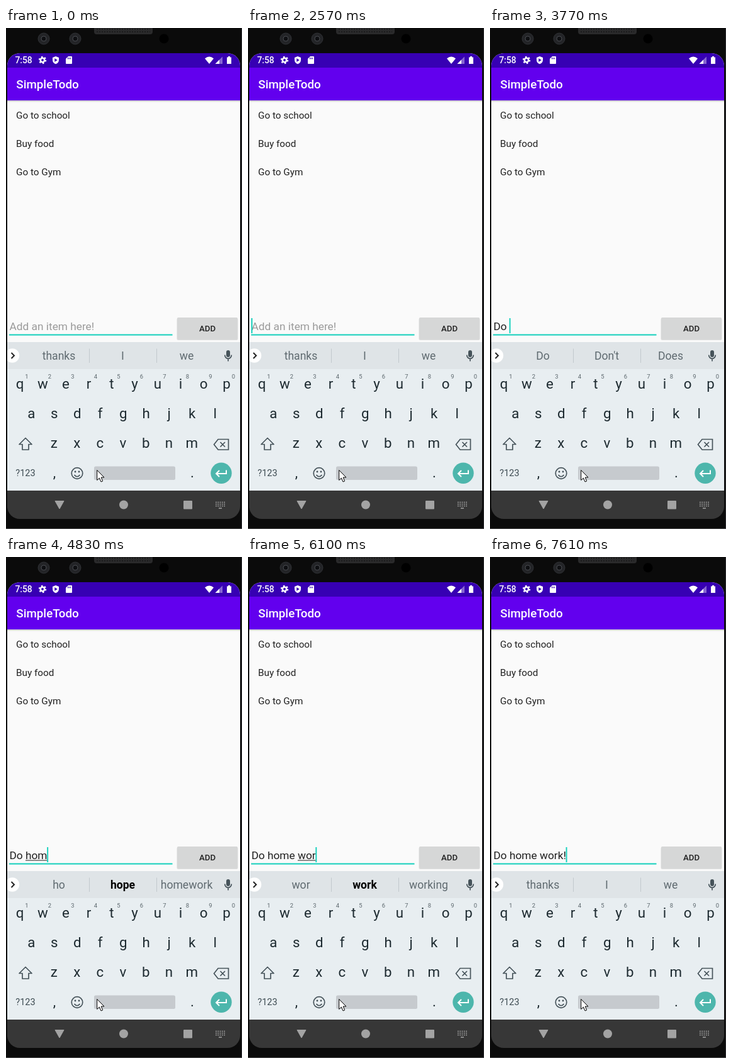
Write an HTML page that moves like this. It is 375 by 796 pixels and loops after 8 s.

```html
<!DOCTYPE html>
<html lang="en">
<head>
<meta charset="utf-8">
<title>Todo app</title>
<style>
  html, body { margin: 0; width: 100%; height: 100%; overflow: hidden; background: #0a0a0a; }
  svg { display: block; width: 375px; height: 796px; font-family: Roboto, "Open Sans", sans-serif; }
  text { white-space: pre; }
  .mid { text-anchor: middle; }
  .med { font-weight: 500; }
  .item { font-size: 15.3px; fill: #212121; }
  .entry { font-size: 17.3px; }
  .key { font-size: 22.3px; fill: #1d2a30; }
  .sup { font-size: 9.4px; fill: #5b666c; }
  .word { font-size: 17.6px; fill: #5f6a70; }
  .word.bold { font-weight: 700; fill: #000; }
  .line { fill: none; stroke: #46535a; stroke-width: 1.7; }
</style>
</head>
<body>
<svg viewBox="0 0 375 796">
  <defs>
    <linearGradient id="shade" x2="0" y2="1">
      <stop offset="0" stop-color="#000" stop-opacity=".22"/>
      <stop offset="1" stop-color="#000" stop-opacity="0"/>
    </linearGradient>
    <clipPath id="screen"><rect x="2" y="40" width="370" height="740" rx="20"/></clipPath>
  </defs>

  <!-- phone body -->
  <rect width="375" height="796" fill="#0b0b0b"/>
  <path d="M374.5 0V796" stroke="#2c2c2e"/>
  <path d="M0 795.5H375" stroke="#4a4a4c"/>
  <rect x="140" y="-6" width="93" height="16" rx="4" fill="#2a2a2b"/>
  <path d="M144 2H229M144 6H229" stroke="#171717" stroke-width="1.5" stroke-dasharray="2 2"/>
  <g fill="#232427" stroke="#303236">
    <circle cx="60" cy="17" r="9"/><circle cx="110" cy="17" r="9"/>
  </g>
  <g fill="#0e0f12" stroke="#484b50">
    <circle cx="60" cy="17" r="4"/><circle cx="110" cy="17" r="4"/>
  </g>
  <circle cx="251" cy="17" r="7.5" fill="#000"/>

  <g clip-path="url(#screen)">
    <rect x="2" y="40" width="370" height="460" fill="#fafafa"/>
    <rect x="2" y="40" width="370" height="23" fill="#3700b3"/>
    <rect x="2" y="63" width="370" height="52" fill="#6200ee"/>
    <rect x="2" y="115" width="370" height="3" fill="url(#shade)"/>

    <!-- status bar -->
    <text class="med" x="14.5" y="56" font-size="13.8" fill="#fff">7:58</text>
    <g fill="#fff">
      <circle cx="58" cy="51" r="3.2" fill="none" stroke="#fff" stroke-width="2.6"/>
      <circle cx="58" cy="51" r="5.2" fill="none" stroke="#fff" stroke-width="2" stroke-dasharray="2.5 2.945"/>
      <path d="M79 45l5 2v3.7q0 4.5-5 6.6q-5-2.100-5-6.600V47z"/>
      <path d="M77.300 48.200l4.500 2.800-4.500 2.800z" fill="#3700b3"/>
      <path d="M99 45h5q1 0 1 1v10q0 1-1 1h-8q-1 0-1-1V49z"/>
      <path d="M98.500 47v2.500M100.500 47v2.500M102.500 47v2.500" stroke="#3700b3"/>
      <path d="M316 48.500q7-6 14 0l-7 8.500z"/>
      <path d="M344 45.500V57H332.500z" opacity=".4"/>
      <path d="M339 50.500V57H332.500z"/>
      <path d="M351 46.500h2v-1.500h3v1.500h2V57h-7z"/>
    </g>

    <text class="med" x="16.3" y="96" font-size="18.8" fill="#fff">SimpleTodo</text>
    <text class="item" x="16" y="143.500">Go to school</text>
    <text class="item" x="16" y="188.500">Buy food</text>
    <text class="item" x="16" y="233.500">Go to Gym</text>

    <!-- entry row -->
    <rect x="5" y="486.500" width="259.500" height="2" fill="#12d0bc"/>
    <text id="hint" class="entry" x="5.500" y="480" fill="#9b9b9b">Add an item here!</text>
    <text id="typed" class="entry" x="5.500" y="480" fill="#212121"></text>
    <rect id="under" y="481.500" height="1" fill="#212121"/>
    <rect id="caret" y="461" width="1.900" height="24" fill="#12d0bc"/>
    <rect x="271.500" y="461" width="97" height="35" rx="2" fill="#000" opacity=".12"/>
    <rect x="272" y="460" width="96" height="34.500" rx="1.500" fill="#d6d7d7"/>
    <text class="mid med" x="320" y="482.200" font-size="13.2" fill="#212121">ADD</text>

    <!-- keyboard -->
    <rect x="2" y="499" width="370" height="236" fill="#e8eef1"/>
    <rect x="2" y="499" width="370" height="43" fill="#dfe4e7"/>
    <path d="M132.500 509.500V532M239.500 509.500V532" stroke="#c2c9cd"/>
    <circle cx="10" cy="520.500" r="11.200" fill="#fff"/>
    <path d="M8.500 516l4.500 4.500-4.500 4.500" class="line" style="stroke:#222;stroke-width:2"/>
    <g id="words"></g>
    <rect x="350" y="512" width="6" height="11" rx="3" fill="#46535a"/>
    <path d="M347.700 519.500a5.300 5.800 0 0 0 10.600 0M353 525.500V529.500" class="line"/>
    <g id="keys"></g>
    <path id="shift" class="line" stroke-linejoin="round" d="M31 651.500L41 661.500H36V670H26V661.500H21z"/>
    <path class="line" d="M337 653.500H353.500V670H337L330.500 661.800zM340.500 658l7.500 7.500M348 658l-7.500 7.500"/>
    <text class="mid" x="31" y="712.300" font-size="14.5" fill="#3d4b52">?123</text>
    <text class="mid key" x="77" y="714">,</text>
    <text class="mid key" x="296" y="714">.</text>
    <circle class="line" cx="113" cy="707.500" r="8.800"/>
    <path class="line" d="M108.500 710q4.500 5.500 9 0"/>
    <g fill="#46535a"><circle cx="110" cy="705" r="1.400"/><circle cx="116" cy="705" r="1.400"/></g>
    <rect x="140" y="696.500" width="129" height="21.500" rx="2.500" fill="#c6cace"/>
    <circle cx="342" cy="707.200" r="16.700" fill="#4db6ac"/>
    <path d="M350 702.500V708H334.500M339 703l-5 5 5 5" fill="none" stroke="#fff" stroke-width="2"/>

    <!-- navigation bar -->
    <rect x="2" y="735" width="370" height="45" fill="#373737"/>
    <g fill="#a3a3a3">
      <path d="M78 751.500H92L85 764z" stroke="#a3a3a3" stroke-linejoin="round"/>
      <circle cx="187" cy="757.500" r="7"/>
      <rect x="282" y="751" width="14" height="13.500" rx="1"/>
    </g>
    <path d="M333 753.500H348M333 756.500H348M333 759.500H348" stroke="#a3a3a3" stroke-width="1.700" stroke-dasharray="1.800 1.500"/>
    <path d="M338 763H343" stroke="#a3a3a3" stroke-width="1.500"/>
  </g>

  <path d="M144.700 702.500V718.500L148.400 715L151 721L153.700 719.900L151.200 714H156z" fill="#fff" stroke="#000" stroke-linejoin="round"/>
</svg>

<script>
const $ = id => document.getElementById(id);
const LOOP = 8000, LEFT = 5.5;

function label(parent, x, y, cls, str) {
  const el = document.createElementNS("http://www.w3.org/2000/svg", "text");
  el.setAttribute("x", x);
  el.setAttribute("y", y);
  el.setAttribute("class", cls);
  el.textContent = str;
  return parent.appendChild(el);
}

const letters = [];
[["qwertyuiop", 22, 572.5], ["asdfghjkl", 40.2, 619.5], ["zxcvbnm", 76.3, 667]].forEach(([row, x0, y], r) => {
  [...row].forEach((ch, i) => {
    const x = x0 + i * 36.5;
    letters.push([label($("keys"), x, y, "mid key", ch), ch]);
    if (r === 0) label($("keys"), x + 11, 557, "mid sup", (i + 1) % 10);
  });
});
const words = [84, 185.5, 287].map(x => label($("words"), x, 527.2, "mid word", ""));

// Each step overrides the state before it. "mark" is where the underlined word
// starts (-1: none); a leading * makes a suggestion bold.
const start = { text: "", mark: -1, caret: 0, caps: 0, words: "thanks I we" };
const steps = [
  [650, { caret: 1 }], [1050, { caret: 0 }], [1610, { caret: 1 }],
  [2140, { caret: 0 }], [2570, { caret: 1 }],
  [2980, { caps: 1 }],
  [3100, { caps: 0, text: "D", mark: 0 }],
  [3220, { words: "D Do Don't" }],
  [3340, { text: "Do", words: "Do Don't Does" }],
  [3770, { text: "Do ", mark: -1 }],
  [3920, { words: "it you not" }],
  [4290, { text: "Do h", mark: 3 }],
  [4440, { words: "h have he" }],
  [4560, { text: "Do ho" }],
  [4680, { words: "ho *hope homework" }],
  [4830, { text: "Do hom" }],
  [4980, { words: "hom *home homework" }],
  [5100, { text: "Do home" }],
  [5220, { words: "home homework some" }],
  [5470, { text: "Do home ", mark: -1, words: "and to from" }],
  [5720, { text: "Do home w", mark: 8 }],
  [5840, { text: "Do home wo", words: "was we with" }],
  [6100, { text: "Do home wor", words: "wor *work working" }],
  [6350, { text: "Do home work", words: "work working works" }],
  [6880, { caret: 0 }],
  [7370, { text: "Do home work!", mark: -1, caret: 1 }],
  [7490, { words: "thanks I we" }]
];

const typed = $("typed");
function width(str) {
  typed.textContent = str;
  return str ? typed.getComputedTextLength() : 0;
}

function draw(s) {
  const from = s.mark < 0 ? 0 : width(s.text.slice(0, s.mark));
  const end = width(s.text);
  $("hint").style.display = s.text ? "none" : "";
  $("under").setAttribute("x", LEFT + from);
  $("under").setAttribute("width", s.mark < 0 ? 0 : end - from);
  $("caret").setAttribute("x", LEFT + end - 0.3);
  $("caret").style.display = s.caret ? "" : "none";
  s.words.split(" ").forEach((w, i) => {
    words[i].textContent = w.replace("*", "");
    words[i].classList.toggle("bold", w[0] === "*");
  });
  for (const [el, ch] of letters) el.textContent = s.caps ? ch.toUpperCase() : ch;
  $("shift").style.fill = s.caps ? "#46535a" : "none";
}

let shown = -1;
function tick() {
  const t = performance.now() % LOOP;
  const past = steps.filter(([at]) => at <= t);
  if (past.length !== shown) {
    shown = past.length;
    draw(Object.assign({}, start, ...past.map(p => p[1])));
  }
  requestAnimationFrame(tick);
}
tick();
</script>
</body>
</html>
```
